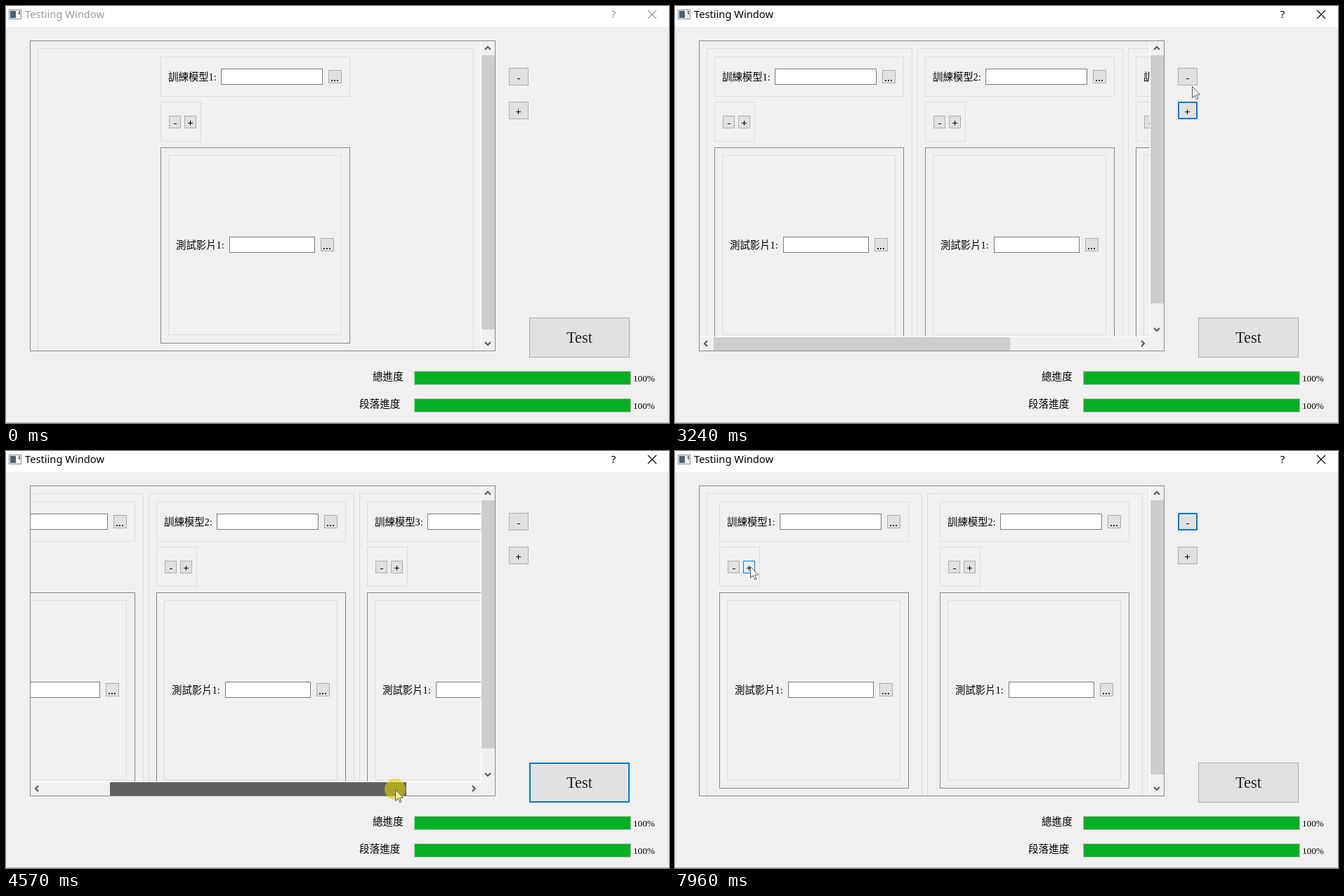
An HTML page with a canvas for the animation above (8 s loop, 944x593 px).

```html
<!DOCTYPE html>
<html lang="zh-Hant">
<head>
<meta charset="utf-8">
<title>Testiing Window</title>
<style>
  html, body { margin: 0; width: 100%; height: 100%; overflow: hidden; background: #f0f0f0; }
  canvas { display: block; width: 944px; height: 593px; }
</style>
</head>
<body>
<canvas id="stage" width="944" height="593"></canvas>
<script>
const ctx = document.getElementById('stage').getContext('2d');
const LOOP = 8000;
const SERIF = '"Liberation Serif", "Noto Sans CJK TC", "Noto Sans CJK", serif';
const SANS = '"Noto Sans", "Open Sans", sans-serif';
const FACE = '#f0f0f0', BLUE = '#0078d7', GROUP = '#dcdcdc', FRAME = '#828790';

const point = (x, y) => ({ x, y });
const linear = k => k;
const easeIn = k => k ** 2.4;
const easeOut = k => Math.sin(k * Math.PI / 2);

// Places the mouse stops at
const entry = point(867, 540), browse = point(470, 101), plus = point(728, 149);
const grab = point(460.5, 481), drop = point(584.5, 481);
const minus = point(731, 101), rest = point(333, 111), smallPlus = point(107, 164);

// Each move is a quadratic curve pulled towards its bend
const MOVES = [
  { from: 130, to: 960, a: entry, bend: point(650, 260), b: browse, ease: linear },
  { from: 960, to: 1650, a: browse, bend: point(703, 180), b: plus, ease: linear },
  { from: 3040, to: 3840, a: plus, bend: point(795, 0), b: grab, ease: linear },
  { from: 4010, to: 4640, a: grab, bend: point(522.5, 481), b: drop, ease: easeIn },
  { from: 4770, to: 5460, a: drop, bend: point(875, -25), b: minus, ease: linear },
  { from: 5960, to: 6580, a: minus, bend: point(550, 410), b: rest, ease: linear },
  { from: 6720, to: 7960, a: rest, bend: point(220, 145), b: smallPlus, ease: easeOut }
];

// Mouse button held down, and what each press does
const ADD_FIRST = { from: 1790, to: 1930 }, ADD_SECOND = { from: 2760, to: 2900 };
const DRAG = { from: 4010, to: 4770 }, REMOVE = { from: 5610, to: 5750 };
const PRESSES = [ADD_FIRST, ADD_SECOND, DRAG, REMOVE];

let mouse, pressed;

function mouseAt(t) {
  const move = MOVES.findLast(m => t >= m.from);
  if (!move) return null;
  const { a, bend, b } = move;
  const k = move.ease(Math.min(1, (t - move.from) / (move.to - move.from)));
  const curve = axis => (1 - k) ** 2 * a[axis] + 2 * k * (1 - k) * bend[axis] + k * k * b[axis];
  return point(curve('x'), curve('y'));
}

function columnCount(t) {
  if (t < ADD_FIRST.to) return 1;
  return t >= ADD_SECOND.to && t < REMOVE.to ? 3 : 2;
}

function focusAt(t) {
  if (t < ADD_FIRST.from) return '';
  if (t < DRAG.from) return '+';
  return t < REMOVE.from ? 'Test' : '-';
}

function rect(x, y, w, h, color) {
  ctx.fillStyle = color;
  ctx.fillRect(x, y, w, h);
}

function box(x, y, w, h, border, fill, line = 1) {
  if (fill) rect(x, y, w, h, fill);
  ctx.strokeStyle = border;
  ctx.lineWidth = line;
  ctx.strokeRect(x + line / 2, y + line / 2, w - line, h - line);
}

function text(str, x, y, size, { font = SERIF, color = '#000', align = 'left' } = {}) {
  ctx.font = `${size}px ${font}`;
  ctx.textAlign = align;
  ctx.fillStyle = color;
  ctx.fillText(str, x, y);
}

function lines(points, color, width) {
  ctx.strokeStyle = color;
  ctx.lineWidth = width;
  ctx.beginPath();
  points.forEach(([x, y]) => ctx.lineTo(x, y));
  ctx.stroke();
}

function isOver(x, y, w, h) {
  return mouse && mouse.x >= x && mouse.x < x + w && mouse.y >= y && mouse.y < y + h;
}

function button(x, y, w, h, focused) {
  const hover = isOver(x, y, w, h);
  const fill = !hover ? '#e1e1e1' : pressed ? '#cce4f7' : '#e5f1fb';
  box(x, y, w, h, hover || focused ? BLUE : '#adadad', fill, focused ? 2 : 1);
}

function sign(kind, cx, cy) {
  if (kind === '-') return rect(cx - 2, cy + 2, 4, 1, '#000');
  rect(cx - 3, cy, 7, 1, '#000');
  rect(cx, cy - 3, 1, 7, '#000');
}

function fieldRow(label, x, middle, fieldX, fieldWidth) {
  text(label, x, middle + 5, 14.4);
  box(fieldX, middle - 12, fieldWidth, 23, '#7a7a7a', '#fff');
  const buttonX = fieldX + fieldWidth + 8;
  button(buttonX, middle - 10, 19, 19);
  for (let i = 0; i < 3; i++) rect(buttonX + 4 + i * 4, middle + 4, 2, 2, '#333');
}

function chevron(cx, cy, dx, dy) {
  lines([
    [cx - dx * 2 - dy * 4, cy - dy * 2 - dx * 4],
    [cx + dx * 2, cy + dy * 2],
    [cx - dx * 2 + dy * 4, cy - dy * 2 + dx * 4]
  ], '#555', 2);
}

function drawTitleBar(active) {
  const color = active ? '#000' : '#999';
  rect(0, 0, 944, 30, '#fff');
  box(4, 5, 18, 14, '#8b8f94', '#f4f4f4');
  rect(6, 7, 8, 10, '#4e6070');
  rect(18, 7, 2, 5, '#667480');
  text('Testiing Window', 27, 16.5, 14.7, { font: SANS, color });
  text('?', 865, 17, 15, { font: SANS, color, align: 'center' });
  lines([[914, 6], [926, 18]], color, 1.1);
  lines([[926, 6], [914, 18]], color, 1.1);
}

function drawColumn(left, width, number) {
  const x = left + Math.floor((width - 270) / 2);
  box(left, 60, width, 460, GROUP);

  box(x, 72, 270, 57, GROUP);
  fieldRow(`訓練模型${number}:`, x + 11, 101, x + 86, 145);

  box(x, 136, 58, 57, GROUP);
  button(x + 12, 156, 17, 18);
  sign('-', x + 21, 165);
  button(x + 34, 156, 17, 18);
  sign('+', x + 42, 166);

  box(x, 201, 270, 279, FRAME);
  box(x + 11, 212, 247, 256, GROUP);
  fieldRow('測試影片1:', x + 22, 340, x + 98, 122);
}

function drawScrollArea(t) {
  const count = columnCount(t), wide = count === 3;
  const bottom = wide ? 470 : 490;
  const dragX = !wide || t < DRAG.from ? 0 : Math.min(mouse.x, drop.x) - grab.x;
  const scrolled = t < DRAG.to ? dragX : drop.x - grab.x;
  const handleShift = wide ? scrolled : 0;
  const shift = Math.round(handleShift * 1.51);

  ctx.save();
  ctx.beginPath();
  ctx.rect(35, 50, 641, bottom - 50);
  ctx.clip();
  const gap = 7;
  const width = wide ? 293 : Math.floor((621 - gap * (count - 1)) / count);
  for (let i = 0; i < count; i++) drawColumn(45 + i * (width + gap) - shift, width, i + 1);
  ctx.restore();

  // Vertical bar
  rect(676, 50, 1, bottom - 50, '#fff');
  const vEnd = wide ? 423 : 460;
  const vHover = t < DRAG.from && isOver(677, 70, 19, vEnd - 70);
  rect(677, 70, 19, vEnd - 70, vHover ? '#a6a6a6' : '#cdcdcd');
  chevron(686, 60, 0, -1);
  chevron(686, bottom - 10, 0, 1);

  if (wide) {
    const x = Math.floor(55 + handleShift);
    let color = '#cdcdcd';
    if (t >= DRAG.to) color = '#b8b8b8';
    else if (t >= DRAG.from) color = '#606060';
    else if (isOver(x, 471, 422, 19)) color = '#a6a6a6';
    rect(35, 470, 641, 1, '#fff');
    rect(x, 471, 422, 19, color);
    chevron(44, 480, -1, 0);
    chevron(666, 480, 1, 0);
  }
  box(34, 49, 663, 442, FRAME);
}

function drawControls(focus) {
  button(716, 88, 28, 25, focus === '-');
  sign('-', 730, 101);
  button(716, 136, 28, 25, focus === '+');
  sign('+', 729, 150);
  button(745, 443, 143, 57, focus === 'Test');
  text('Test', 816.5, 479, 22.5, { align: 'center', color: '#222' });
}

function drawProgress(label, labelX, y) {
  text(label, labelX, y + 13, 14.6);
  box(581, y, 309, 20, '#bcbcbc', '#06b025');
  text('100%', 893, y + 15, 13.2);
}

function drawMouse() {
  if (!mouse) return;
  const x = Math.round(mouse.x), y = Math.round(mouse.y);
  if (pressed) {
    ctx.fillStyle = 'rgba(220, 210, 0, .62)';
    ctx.beginPath();
    ctx.arc(x, y, 15, 0, Math.PI * 2);
    ctx.fill();
  }
  const arrow = [[0, 0], [0, 16], [3.6, 12.6], [6.2, 18.3], [8.5, 17.3], [6, 11.7], [11, 11.5]];
  ctx.beginPath();
  arrow.forEach(([dx, dy]) => ctx.lineTo(x + dx + .5, y + dy + .5));
  ctx.closePath();
  ctx.fillStyle = pressed ? '#f4ee90' : '#fff';
  ctx.fill();
  ctx.strokeStyle = '#555';
  ctx.lineWidth = 1;
  ctx.stroke();
}

function draw(t) {
  mouse = mouseAt(t);
  pressed = PRESSES.some(press => t >= press.from && t < press.to);
  rect(0, 0, 944, 593, FACE);
  drawTitleBar(t >= ADD_FIRST.from);
  drawScrollArea(t);
  drawControls(focusAt(t));
  drawProgress('總進度', 522, 519);
  drawProgress('段落進度', 503, 558);
  rect(0, 592, 944, 1, '#b4b4b4');
  drawMouse();
}

const start = performance.now();
function tick() {
  draw((performance.now() - start) % LOOP);
  requestAnimationFrame(tick);
}
tick();
</script>
</body>
</html>
```
